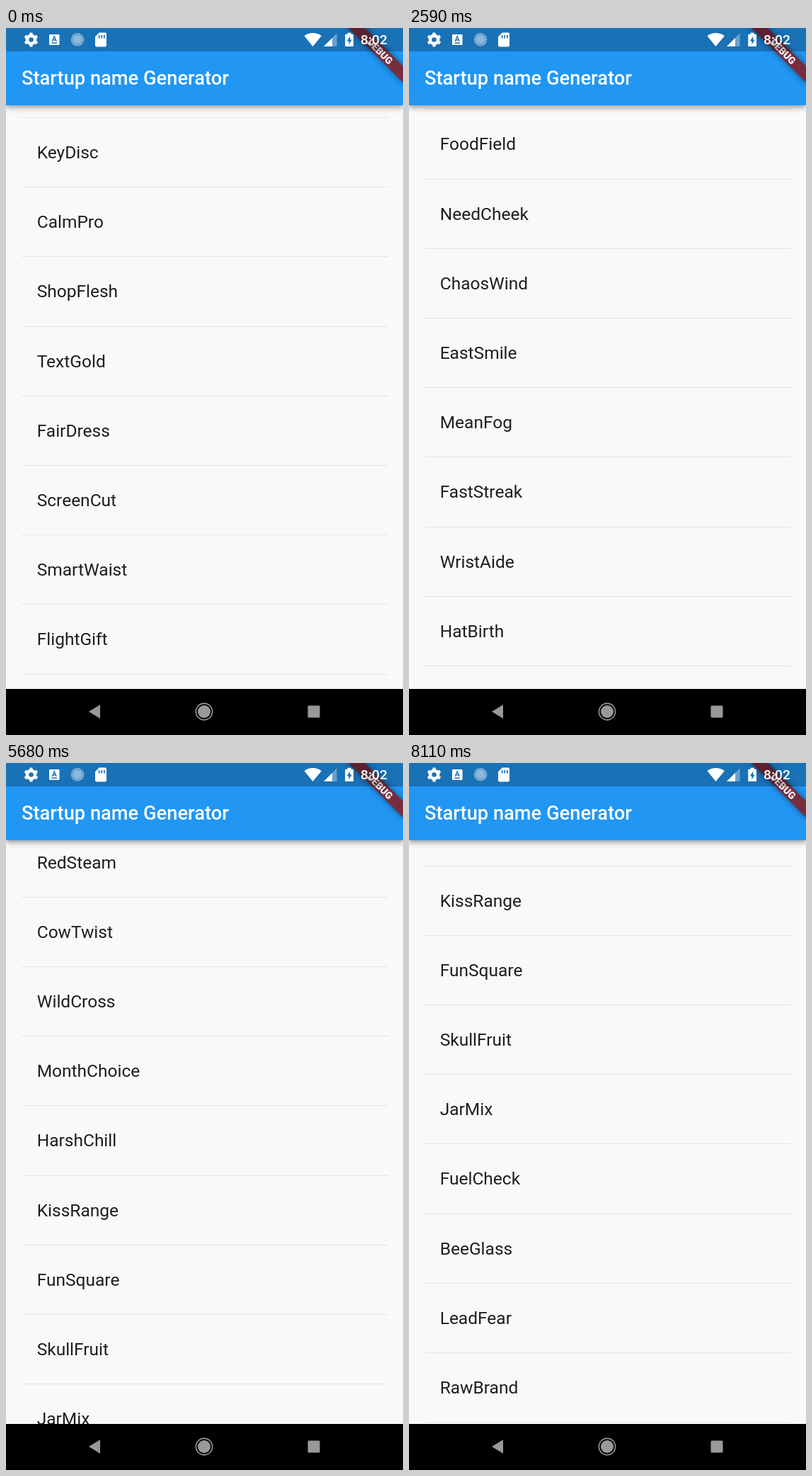
Animation, 561 px wide and 998 px high, one loop 8850 ms. Source, as an HTML page:

```html
<!DOCTYPE html>
<html lang="en">
<head>
<meta charset="utf-8">
<title>Startup name Generator</title>
<style>
  html, body { margin: 0; width: 100%; height: 100%; overflow: hidden; }
  body { position: relative; background: #f9f9fa; font-family: Roboto, sans-serif; }
  #list { position: absolute; left: 22px; top: 126px; width: 517.5px; }
  .row {
    position: absolute; left: 0; width: 100%; height: 98px; box-sizing: border-box;
    border-top: 1px solid #e4e4e7; padding-left: 21.7px;
    font-size: 24.5px; line-height: 98px; color: #1e1e20; white-space: nowrap;
  }
  #bar {
    position: absolute; left: 0; top: 0; width: 561px; height: 109px; background: #2196f3;
    box-shadow: 0 3px 5px -1px rgba(0,0,0,.2), 0 5px 7px rgba(0,0,0,.14), 0 1px 14px rgba(0,0,0,.12);
  }
  #bar h1 {
    position: absolute; left: 22px; top: 33px; margin: 0;
    font-size: 27.27px; font-weight: 500; line-height: 77px; color: #fff; white-space: nowrap;
  }
  #corner { position: absolute; left: 441px; top: 0; width: 120px; height: 120px; overflow: hidden; }
  #banner {
    position: absolute; left: 32.7px; top: 24.6px; width: 109px; height: 16.4px;
    transform: rotate(45deg); background: rgba(141,22,22,.81);
    box-shadow: 0 0 8px rgba(0,0,0,.5);
    font-size: 13.9px; font-weight: 900; line-height: 16.4px; text-align: center; color: #fff;
  }
  svg { position: absolute; left: 0; top: 0; }
</style>
</head>
<body>
<div id="list"></div>
<div id="bar"><h1>Startup name Generator</h1></div>
<div id="corner"><div id="banner">DEBUG</div></div>
<svg width="561" height="998" viewBox="0 0 561 998" fill="#fff">
  <rect width="561" height="33" fill="#000" opacity=".25"/>
  <!-- settings -->
  <g fill="none" stroke="#fff">
    <circle cx="35.5" cy="16.5" r="5.6" stroke-width="4.6"/>
    <circle cx="35.5" cy="16.5" r="8.4" stroke-width="3.2" pathLength="6" stroke-dasharray=".46 .54" stroke-dashoffset="-.27"/>
  </g>
  <!-- keyboard -->
  <rect x="61" y="9" width="14.5" height="15" rx="1"/>
  <path d="M65.2 19 68.2 11.8 71.2 19M66.3 16.8h3.8M64.5 21.2h7.5" fill="none" stroke="#1971b7" stroke-width="1.4"/>
  <!-- progress disc -->
  <circle cx="101" cy="16.3" r="6.8" opacity=".5"/>
  <circle cx="101" cy="16.3" r="8.2" fill="none" stroke="#fff" stroke-width="2" stroke-dasharray="1.4 1" opacity=".75"/>
  <!-- memory card -->
  <path d="M131.8 6.5H140q2 0 2 2v16q0 2-2 2H128q-2 0-2-2V12.3z"/>
  <path d="M131.6 10v4.6M135.2 10v4.6M138.8 10v4.6" stroke="#1971b7" stroke-width="1.7"/>
  <!-- wifi, signal, battery -->
  <path d="M433.5 26 421.5 11.2Q427 7 433.5 7T445.8 11.2z"/>
  <path d="M467.5 7.5V26H449z" opacity=".35"/>
  <path d="M461 14V26H449z"/>
  <path d="M482.6 8.7V6.8h5v1.9h2.2q1.2 0 1.2 1.2v15q0 1.2-1.2 1.2h-9.4q-1.2 0-1.2-1.2v-15q0-1.2 1.2-1.2z"/>
  <path d="M486.2 11.5 481.8 18.5h2.6v5L488.7 16.5h-2.5z" fill="#1971b7"/>
  <text x="501" y="23" font-size="19.2" font-weight="500" font-family="Roboto, sans-serif">8:02</text>
  <!-- navigation -->
  <rect y="933" width="561" height="65" fill="#000"/>
  <g fill="#999">
    <path d="M117 965 133 955.2V974.8z"/>
    <circle cx="280" cy="965" r="9"/>
    <circle cx="280" cy="965" r="11.6" fill="none" stroke="#999" stroke-width="1.6"/>
    <rect x="426.5" y="956.5" width="17" height="17" rx="1.5"/>
  </g>
</svg>
<script>
const LOOP = 8850, PITCH = 98.2;
const names = ("KeyDisc CalmPro ShopFlesh TextGold FairDress ScreenCut SmartWaist FlightGift RoughFluid " +
  "SadKit LightGrace DuePage FoodField NeedCheek ChaosWind EastSmile MeanFog FastStreak WristAide " +
  "HatBirth OddsGlobe BroadRoll AuntSong RedSteam CowTwist WildCross MonthChoice HarshChill KissRange " +
  "FunSquare SkullFruit JarMix FuelCheck BeeGlass LeadFear RawBrand").split(" ");

// start ms, end ms, scroll offset reached
const swipes = [
  [800, 1600, 649],
  [2000, 2800, 1209.5],
  [3390, 4020, 1787.7],
  [4650, 5300, 2299],
  [5470, 5680, 2293.8],
  [5840, 6400, 1648.2],
  [6520, 7270, 2299],
  [7730, 8110, 2731]
];

const list = document.getElementById("list");
[...names, ""].forEach((name, i) => {
  const row = document.createElement("div");
  row.className = "row";
  row.style.top = i * PITCH + "px";
  row.textContent = name;
  list.append(row);
});

// A short finger drag speeds up, then the fling slows down by friction.
const DRAG = 0.2, DRAG_PART = 0.278;
function swipe(u) {
  if (u < DRAG) return DRAG_PART * (u / DRAG) ** 2;
  const v = (u - DRAG) / (1 - DRAG);
  const fling = (1.2 * v ** 3 - 3.27 * v ** 2 + 3.065 * v) / 0.995;
  return DRAG_PART + (1 - DRAG_PART) * fling;
}

function offsetAt(t) {
  let pos = 0;
  for (const [start, end, to] of swipes) {
    if (t < start) break;
    pos += (to - pos) * swipe(Math.min(1, (t - start) / (end - start)));
  }
  return pos;
}

const begin = performance.now();
function draw() {
  const t = (performance.now() - begin) % LOOP;
  list.style.transform = `translateY(${-Math.round(offsetAt(t))}px)`;
  requestAnimationFrame(draw);
}
draw();
</script>
</body>
</html>
```
